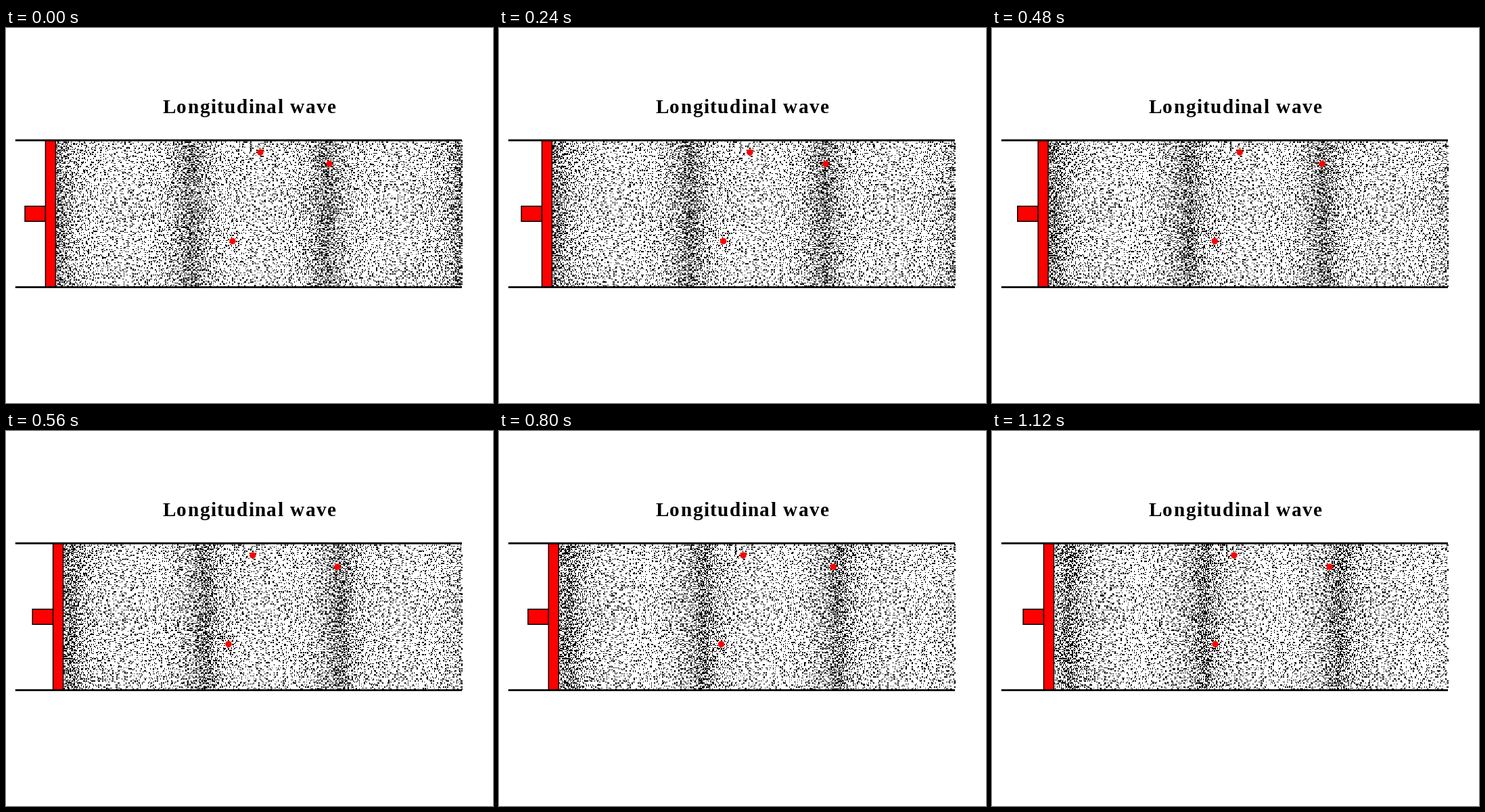
A matplotlib script that plays this animation: 720 by 555 pixels, repeating every 1200 ms.

```python
import numpy as np
import matplotlib.pyplot as plt
from matplotlib.animation import FuncAnimation
from matplotlib.patches import Circle, Rectangle

W, H, DPI = 720, 555, 120
PT = 72 / DPI                      # points per pixel
FRAMES, STEP_MS = 15, 80

TOP, BOTTOM, LEFT, RIGHT = 166.2, 383.6, 13.8, 674
FACE = 74                          # rest position of the piston face
ROD_X, PLATE_X = 28, 58.4
AMP, WAVELENGTH, PERIOD = 19, 200, 70
OMEGA = 2 * np.pi / PERIOD
CELL = 1.5                         # size of one gas particle
GRID_TOP, COLS, ROWS = 167, 450, 144

fig = plt.figure(figsize=(W / DPI, H / DPI), dpi=DPI, facecolor="white")
ax = fig.add_axes([0, 0, 1, 1])
ax.axis("off")


def shift(n, lag):
    """Displacement at step n for a point that trails the piston by lag steps."""
    return AMP * np.sin(OMEGA * (n - lag))


def spaced_text(text, x, y, size, gap):
    """Draw text with extra letter spacing."""
    font = dict(family="Liberation Serif", weight="bold", size=size * PT)
    probe = ax.text(0, 0, "", **font)
    renderer = fig.canvas.get_renderer()

    def width(s):
        probe.set_text(s)
        return probe.get_window_extent(renderer).width

    for i, ch in enumerate(text):
        if ch != " ":
            dx = width(text[:i + 1]) - width(ch) + i * gap
            ax.text(x + dx, y, ch, va="baseline", **font)
    probe.remove()


# Gas particles at rest: a loose grid, shaken
rng = np.random.default_rng(7)
PITCH = 2 * CELL
gx, gy = np.meshgrid(np.arange(FACE, RIGHT + 30, PITCH),
                     np.arange(0, ROWS, 2))
rest = gx.ravel() + rng.uniform(-0.5, 1.5, gx.size) * PITCH
rest = np.where(rest < FACE, 2 * FACE - rest, rest)
row = (gy.ravel() + rng.integers(-1, 3, gy.size)) % ROWS
lag = (rest - FACE) / WAVELENGTH * PERIOD


def gas_image(n):
    img = np.ones((ROWS, COLS))
    col = np.floor((rest + shift(n, lag)) / CELL).astype(int)
    seen = col < COLS
    img[row[seen], col[seen]] = 0
    return img


gas = ax.imshow(gas_image(0), cmap="gray", vmin=0, vmax=1, aspect="auto",
                interpolation="nearest", zorder=1,
                extent=(0, COLS * CELL, GRID_TOP + ROWS * CELL, GRID_TOP))
ax.set_xlim(0, W)
ax.set_ylim(H, 0)

# Piston, then the tube walls
box = dict(facecolor="red", edgecolor="black", linewidth=1.5 * PT,
           snap=False, zorder=3)
rod = ax.add_patch(Rectangle((ROD_X, 263.7), 30.5, 22.5, **box))
plate = ax.add_patch(Rectangle((PLATE_X, 166.5), 15, 217, **box))
for y in (TOP, BOTTOM):
    ax.plot([LEFT, RIGHT], [y, y], color="black", lw=2.8 * PT, snap=False,
            solid_capstyle="butt", zorder=4)

# Marked particles: rest x, y, lag in steps
MARKS = [(376, 184, 35), (483.5, 201, 73.3), (347.5, 315.5, 27)]
dots = [ax.add_patch(Circle((x, y), 4.7, color="red", lw=0, zorder=5))
        for x, y, _ in MARKS]

spaced_text("Longitudinal wave", 231, 125.5, 29.2, 1.5)


def update(n):
    gas.set_data(gas_image(n))
    dx = shift(n, 0)
    rod.set_x(ROD_X + dx)
    plate.set_x(PLATE_X + dx)
    for dot, (x, y, late) in zip(dots, MARKS):
        dot.center = (x + shift(n, late), y)
    return [gas, rod, plate, *dots]


anim = FuncAnimation(fig, update, frames=FRAMES, interval=STEP_MS,
                     repeat=True, repeat_delay=0, blit=False)
plt.show()
```
